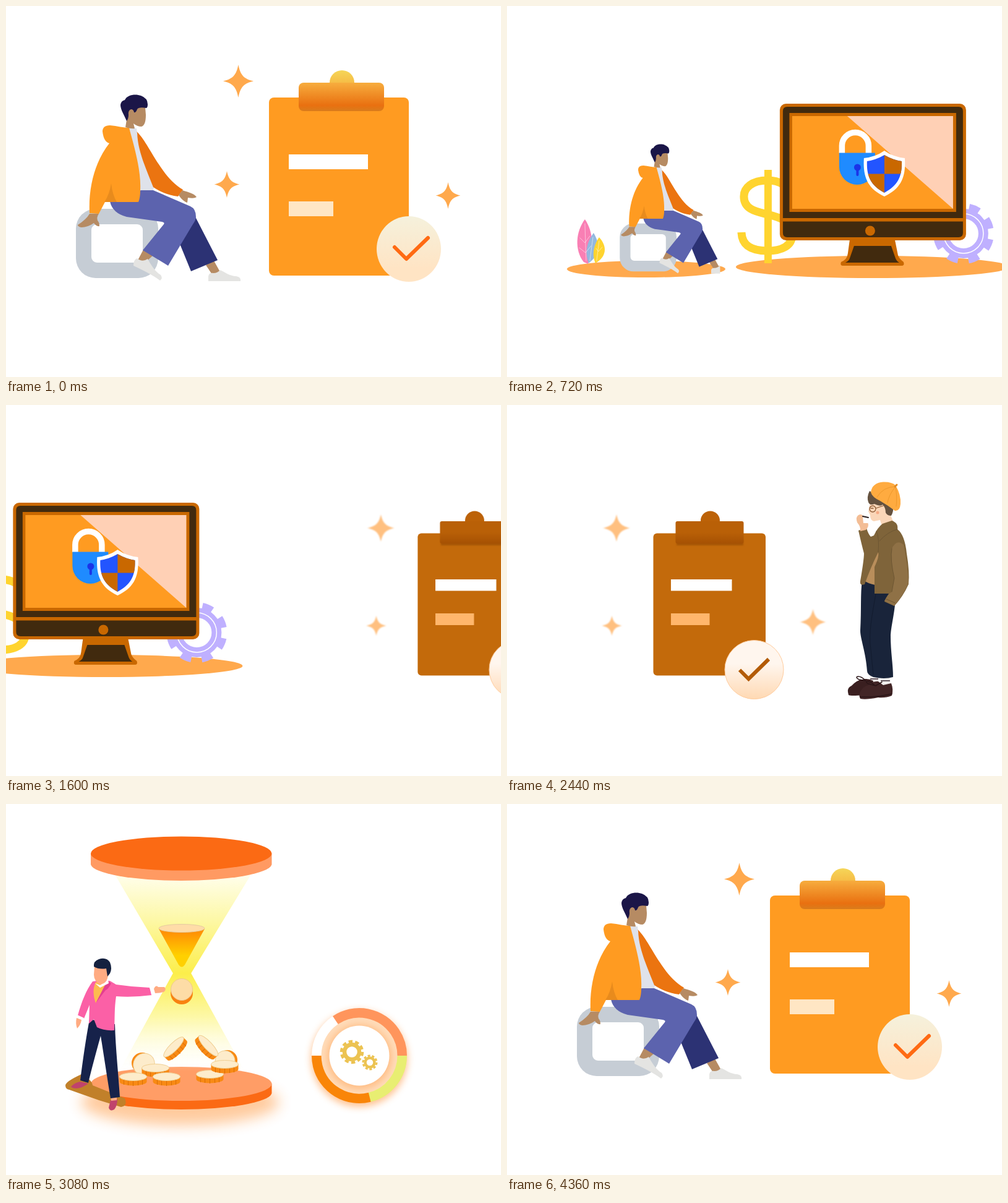
Recreate the animation shown at these times as an HTML page. Size 800 by 600 pixels, loop 4.4 s.

```html
<!DOCTYPE html>
<html lang="en">
<head>
<meta charset="utf-8">
<title>Sliding scenes</title>
<style>
html, body { margin: 0; width: 100%; height: 100%; overflow: hidden; background: #fff; }
svg { display: block; width: 100vw; height: 100vh; }
.skin { fill: #b68b63; }
.shoe { fill: #e4e4e2; }
.orange { fill: #ff9b21; }
.rust { fill: #c96800; }
.dark { fill: #412a0e; }
.line { fill: none; stroke-linecap: round; stroke-linejoin: round; }
</style>
</head>
<body>
<svg viewBox="0 0 800 600">
<defs>
  <linearGradient id="knob" x2="0" y2="1"><stop stop-color="#f5d658"/><stop offset=".6" stop-color="#f6b843"/></linearGradient>
  <linearGradient id="clip" x2="0" y2="1"><stop stop-color="#f7ad3e"/><stop offset=".8" stop-color="#e97010"/><stop offset="1" stop-color="#d97c1c"/></linearGradient>
  <linearGradient id="badge" x2="0" y2="1"><stop stop-color="#f5f1dc"/><stop offset=".8" stop-color="#ffe4c4"/></linearGradient>
  <linearGradient id="brownClip" x2="0" y2="1"><stop offset=".5" stop-color="#b96007"/><stop offset="1" stop-color="#a65103"/></linearGradient>
  <linearGradient id="paleBadge" x2="0" y2="1"><stop offset=".4" stop-color="#fff6ee"/><stop offset="1" stop-color="#ffd9b3"/></linearGradient>
  <linearGradient id="beamTop" x2="0" y2="1"><stop stop-color="#fffeec"/><stop offset=".45" stop-color="#fdf8a8"/><stop offset="1" stop-color="#fcee4a"/></linearGradient>
  <linearGradient id="beamLow" x2="0" y2="1"><stop stop-color="#fcee4a"/><stop offset=".45" stop-color="#fdf8a8"/><stop offset="1" stop-color="#fffef0" stop-opacity="0"/></linearGradient>
  <linearGradient id="cone" x2="0" y2="1"><stop offset=".1" stop-color="#ff9204"/><stop offset=".7" stop-color="#ffd000"/></linearGradient>
  <filter id="soft" x="-20%" y="-20%" width="140%" height="140%"><feGaussianBlur stdDeviation=".8"/></filter>
  <filter id="glow" x="-50%" y="-60%" width="200%" height="220%"><feGaussianBlur stdDeviation="11"/></filter>
  <filter id="halo" x="-30%" y="-30%" width="160%" height="160%"><feGaussianBlur stdDeviation="6"/></filter>
  <clipPath id="cut"><path d="M0 0H348V600H0Z"/></clipPath>
  <clipPath id="shield"><path d="M610 241Q624 249 638 251C639 274 633 290 610 302C587 290 581 274 582 251Q596 249 610 241Z"/></clipPath>

  <path id="star" d="M0-1C.14-.36 .36-.14 1 0C.36.14 .14.36 0 1C-.14.36-.36.14-1 0C-.36-.14-.14-.36 0-1Z"/>

  <g id="sitter">
    <path fill="#c6cdd5" fill-rule="evenodd" d="M145 328H214A32 32 0 0 1 246 360V408A32 32 0 0 1 214 440H145A32 32 0 0 1 113 408V360A32 32 0 0 1 145 328ZM147 353A9 9 0 0 0 138 362V406A9 9 0 0 0 147 415H212A9 9 0 0 0 221 406V362A9 9 0 0 0 212 353Z"/>
    <path class="skin" d="M323 419L336 412L346 430L333 434Z"/>
    <path class="shoe" d="M327 445V437Q328 431 335 432Q342 432 346 427C353 430 362 437 372 437Q380 438 379 445Z"/>
    <path fill="#2c3274" d="M306 341L342 411L299 429L279 380Z"/>
    <path class="skin" d="M222 394L238 403L227 413L212 413Z"/>
    <path class="shoe" d="M206 420Q206 410 212 408Q220 415 229 409C234 418 241 430 250 435Q254 440 249 444Q236 434 206 420Z"/>
    <path fill="#5c63ae" d="M168 316L218 298H238L298 324Q307 328 307 341Q307 346 302 353L262 420L221 395L255 353Q257 350 252 349L195 341Q172 335 168 316Z"/>
    <path fill="#dfe2ea" d="M196 197L211 198L212 205C216 240 230 265 239 294L238 298H217Z"/>
    <path fill="#eb7410" d="M211 203C230 219 250 277 286 297L278 308C262 306 250 301 238 293C226 262 213 235 212 205Z"/>
    <path class="skin" d="M285 298C295 301 305 304 308 309Q304 312 294 310L293 318Q286 316 279 306Z"/>
    <path class="orange" d="M156 203Q156 193 168 193C180 194 190 197 199 197C205 220 219 265 217 298Q217 310 214 317H160L150 336L135 335C133 290 145 250 167 222Q158 220 156 203Z"/>
    <path fill="#e88b1d" d="M170 287Q172 305 179 317H159Q167 305 170 287Z"/>
    <path class="skin" d="M135 336H150Q146 342 148 347Q151 350 151 356Q146 357 142 351Q132 358 122 358Q116 357 116 354Q130 345 135 336Z"/>
    <path class="skin" d="M195 184L193 196Q203 199 208 198L206 190Q212 195 219 195Q226 193 226 176L225 164L205 160L196 168Z"/>
    <path fill="#1b1648" d="M195 186C192 178 185 168 185 160Q186 153 192 152C196 143 210 142 218 145Q229 149 229 159Q229 164 227 165Q214 163 212 167Q210 173 207 172Q206 167 202 167Q197 169 198 176Q198 182 195 186Z"/>
  </g>

  <g id="coin">
    <path fill="#f88a14" d="M-22 0V8A22 6.5 0 0 0 22 8V0Z"/>
    <path stroke="#d96f08" d="M-15 5V13M-8 6V14M0 7V15M8 6V14M15 5V13"/>
    <ellipse rx="22" ry="6.5" fill="#fdeccb" stroke="#f0cf92"/>
  </g>
</defs>

<g class="slide">
  <g fill="#ffa94d">
    <use href="#star" transform="translate(375.5 121.5) scale(24.5 26.5)"/>
    <use href="#star" transform="translate(357 288.5) scale(20.5 21.5)"/>
    <use href="#star" transform="translate(714.5 306.5) scale(20 21.5)"/>
  </g>
  <use href="#sitter"/>
  <rect class="orange" x="425" y="148" width="226" height="288" rx="8"/>
  <circle cx="543" cy="124" r="20" fill="url(#knob)"/>
  <rect x="473" y="124" width="138" height="46" rx="8" fill="url(#clip)"/>
  <path fill="#fff" d="M457 240h128v24h-128z"/>
  <path fill="#ffe6c4" d="M457 316h72v24h-72z"/>
  <ellipse cx="651" cy="393" rx="52" ry="53" fill="url(#badge)"/>
  <path class="line" stroke="#ff6a13" stroke-width="6" d="M628 390L647 409L682 375"/>
</g>

<g class="slide"><g transform="translate(-53)">
  <g fill="#ffa94d">
    <ellipse cx="225" cy="425.5" rx="128" ry="13.5"/>
    <ellipse cx="591" cy="422" rx="221" ry="18"/>
  </g>
  <path fill="#f97fb4" d="M126 345C111 365 109 395 124 414L131 417C141 395 140 365 126 345Z"/>
  <path fill="#93b8df" d="M140 367C151 385 151 402 132 416C124 395 132 378 140 367Z"/>
  <path fill="#ffd42f" d="M149 374C162 388 162 405 143 416C136 400 142 384 149 374Z"/>
  <path class="line" stroke="#fff" stroke-opacity=".5" d="M126 352L128 412M118 375L126 383L134 372M117 391L127 399L136 388M139 374L134 412M149 380L145 412M144 392L148 397L154 390"/>
  <g transform="translate(104.4 124) scale(.69 .694)"><use href="#sitter" clip-path="url(#cut)"/></g>
  <path fill="none" stroke="#ffd42f" stroke-width="13" d="M459 308C456 290 440 282 421 282C396 282 383 294 383 308C383 330 405 333 421 337C447 343 461 350 461 370C461 388 444 396 421 396C396 396 380 388 379 366"/>
  <path fill="#ffd42f" d="M416 265h12v151h-12z"/>
  <g transform="translate(738 368)" fill="none" stroke="#bfb0ff">
    <circle r="43" stroke-width="12" pathLength="16" stroke-dasharray="1" transform="rotate(-78)"/>
    <circle r="32" stroke-width="16"/>
    <circle r="32" stroke="#fff" stroke-width="1.5"/>
  </g>
  <rect class="rust" x="441" y="158" width="301" height="221" rx="10"/>
  <path class="dark" d="M453 163H730Q737 163 737 170V343H446V170Q446 163 453 163ZM446 348.5H737V367Q737 374 730 374H453Q446 374 446 367Z"/>
  <path class="rust" d="M456.5 173H726V333H456.5Z"/>
  <path class="orange" d="M461 178H721V328H461Z"/>
  <path fill="#ffd0b5" d="M550 178H721V328Z"/>
  <circle class="rust" cx="587" cy="363.5" r="8"/>
  <path class="rust" d="M554 378H627L632 403Q634 409 641 414Q643 420 638 420H543Q538 420 540 414Q550 410 551 400Z"/>
  <path class="dark" d="M561 388H621L628 408Q630 413 634 415H547Q553 412 554 408Z"/>
  <path fill="none" stroke="#fff" stroke-width="9.5" d="M541.5 238V226A21.5 21.5 0 0 1 584.5 226V238"/>
  <path fill="#1f8bff" d="M537 237.5H595V260A29 29 0 0 1 537 260Z"/>
  <g fill="#1a34e8"><circle cx="566.5" cy="261" r="5.5"/><rect x="564.5" y="261" width="4" height="14" rx="2"/></g>
  <path fill="#fff" d="M610 234Q624 244 643 246C645 275 638 295 610 308C582 295 575 275 577 246Q596 244 610 234Z"/>
  <g clip-path="url(#shield)">
    <path fill="#2355ff" d="M575 235H645V310H575Z"/>
    <path class="rust" d="M610 235H645V271.5H575V310H610Z"/>
  </g>
</g></g>

<g class="slide"><g transform="translate(5.5)">
  <g fill="#ffc080" filter="url(#soft)">
    <use href="#star" transform="translate(177 199) scale(22)"/>
    <use href="#star" transform="translate(169.5 357) scale(16)"/>
    <use href="#star" transform="translate(494.5 351) scale(21)"/>
  </g>
  <rect x="236.5" y="207.5" width="181.5" height="230" rx="6" fill="#c36a0b"/>
  <path fill="#8a4300" opacity=".5" filter="url(#soft)" d="M274 218H382V227H274Z"/>
  <circle cx="328.5" cy="187" r="15.5" fill="#bc6208"/>
  <rect x="272.5" y="188" width="110" height="36" rx="3" fill="url(#brownClip)"/>
  <path fill="#fff" d="M265 282h98.500v18.500h-98.500z"/>
  <path fill="#ffb66c" d="M265 337h62.500v19h-62.500z"/>
  <circle cx="399.5" cy="428" r="47.5" fill="url(#paleBadge)" stroke="#ffcb9c"/>
  <path fill="none" stroke="#b35b05" stroke-width="6" d="M376 428.5L390.5 443L423 411"/>

  <path fill="#f2f0ee" d="M586 436H600V450H586ZM604 440H619V455H604Z"/>
  <path stroke="#3a2a33" stroke-width="1.5" d="M587 443H600M604 446H619"/>
  <path fill="#3a1f20" d="M551 464Q550 457 557 454Q565 445 574 444Q582 441 592 446L590 460L576 469Q556 471 552 469Z"/>
  <path fill="#422526" d="M571 464Q574 456 584 453Q590 446 600 447L608 453L621 450Q625 460 622 470Q612 474 600 473Q580 477 571 475Q568 470 571 464Z"/>
  <path class="line" stroke="#2a1517" stroke-width="1.5" d="M579 445C568 435 560 440 569 444L580 446M594 453C584 444 576 447 584 451L596 454L606 448M571 472Q600 473 622 467"/>
  <path fill="#19243a" d="M574 284Q578 280 586 285L628 308C628 330 621 356 620 372C620 400 624 420 624 440Q610 444 592 440Q582 436 582 430C580 400 571 378 571 365C573 330 571 305 574 284Z"/>
  <path class="line" stroke="#121b2e" d="M596 306C590 340 584 370 588 395L592 436"/>
  <path fill="#fad6b8" d="M587 158L584 172L587 178Q587 187 593 188L603 186L606 196L624 188L616 168L608 156Z"/>
  <path fill="#b98e5b" d="M598 214L584 250L577 284Q584 289 595 291L604 230Z"/>
  <path fill="#7f643a" d="M568 203L581 199Q584 209 588 213L593 211Q599 198 607 192L622 187Q633 191 631 201Q643 210 646 240Q651 270 649 290Q640 310 626 325L610 318L617 305L594 305L594 262Q602 245 600 238Q588 262 578 290Q570 293 571 285Q577 250 577 240Q573 225 568 203Z"/>
  <path fill="#8f7146" d="M622 232Q630 216 641 226Q648 260 649 288Q640 308 626 325L610 317Q615 306 622 302L626 280Q619 250 622 232Z"/>
  <path class="line" stroke="#6d5633" d="M622 232Q619 250 626 280L622 302M597 204Q602 214 600 238M631 201Q615 205 602 220M613 314L627 320"/>
  <path fill="#f3bd95" d="M571 204Q572 197 566 190Q563 181 568 178Q573 175 576 180L583 190Q586 196 580 202Z"/>
  <path fill="#fff" d="M575 181L585 183L583 191H576Z"/>
  <path class="line" stroke="#2c2020" stroke-width="2" d="M575 180L584 182"/>
  <path fill="#65523f" d="M586 139Q581 149 584 157Q586 163 594 160Q604 165 607 161Q612 166 612 174Q614 179 621 179Q625 172 624 166L600 148Z"/>
  <path fill="#ffab40" d="M588 141Q590 126 608 124.5Q622 124 628 130Q637 145 636 160Q635 172 627 171Q615 162 603 155Q590 149 588 141Z"/>
  <path class="line" stroke="#ee982b" d="M628 132Q608 132 598 149M628 132Q617 145 615 158M628 132Q631 150 629 164"/>
  <path class="line" stroke="#e28b24" stroke-width="3" d="M627 132L630 129"/>
  <path class="line" stroke="#8c5a33" stroke-width="1.3" d="M586 168A5 5 0 1 0 596 168A5 5 0 1 0 586 168M596 167L608 163M588 167H592"/>
  <circle cx="599" cy="174" r="2.5" fill="#f6aa85"/>
</g></g>

<g class="slide">
  <ellipse cx="281" cy="482" rx="160" ry="38" fill="#ff9336" opacity=".48" filter="url(#glow)"/>
  <path fill="#fb6a14" d="M137 452V468A146.5 27.5 0 0 0 429.5 468V452Z"/>
  <ellipse cx="283.25" cy="452.5" rx="146.25" ry="27.5" fill="#ff9d66"/>
  <path fill="url(#beamTop)" d="M176 114H396L299 274H270Z"/>
  <path fill="url(#beamLow)" d="M270 273.5H299L386 432H183Z"/>
  <path fill="#ff9a62" d="M137 80V98A146.5 27.5 0 0 0 429.5 98V80Z"/>
  <ellipse cx="283.25" cy="80" rx="146.25" ry="27.5" fill="#fb6a14"/>
  <path fill="url(#cone)" d="M247 202H321L289 260Q284 267 279 260Z"/>
  <ellipse cx="284" cy="201" rx="37" ry="6.5" fill="#ffdca8" stroke="#e5cba0"/>
  <circle cx="284" cy="306" r="18" fill="#f88210"/>
  <circle cx="284" cy="300" r="17.5" fill="#fddca6" stroke="#efc88b"/>

  <g stroke="#f0cf92">
    <circle cx="220" cy="419" r="17" fill="#f88a14" stroke="none"/>
    <ellipse cx="223" cy="421" rx="17" ry="18" fill="#fdeccb" transform="rotate(30 223 421)"/>
    <circle cx="358" cy="414" r="16" fill="#f88a14" stroke="none"/>
    <ellipse cx="354" cy="416" rx="16" ry="17" fill="#fdeccb"/>
  </g>
  <use href="#coin" transform="translate(271 393) rotate(-45)"/>
  <use href="#coin" transform="translate(327 391) rotate(47)"/>
  <use href="#coin" x="241.5" y="427"/>
  <use href="#coin" x="205.5" y="441"/>
  <use href="#coin" x="259.5" y="441"/>
  <use href="#coin" x="329.5" y="437"/>
  <use href="#coin" x="353.5" y="421"/>

  <path fill="#c1802a" d="M96 455Q96 449 122 437Q139 446 140 455L192 476Q197 488 186 490L150 479L102 462Q96 461 96 455Z"/>
  <path fill="#c0436c" d="M105 457Q112 450 120 449L133 452Q124 459 114 460Q107 460 105 457ZM169 479L180 477Q180 488 175 494Q168 498 166 491Z"/>
  <path fill="#ffab82" d="M169 473H179V479L170 480Z"/>
  <path fill="#16224a" d="M135 348L176 356C177 395 182 440 184 474L169 476C163 440 158 405 153 375C146 400 138 430 133 451L120 447C124 415 129 380 135 348Z"/>
  <path fill="#fb60a6" d="M140 287Q156 284 168 286L178 292Q205 296 232 297L236 309Q205 313 178 311C175 330 176 345 175 366Q158 367 147 361L142 348L134 355L135 325L126 347L116 342C122 320 130 300 140 287Z"/>
  <path fill="#e33f90" d="M163 285L170 290Q165 300 161 301L145 322Z"/>
  <path fill="#fdbb4f" d="M145 288L162 289L145 322Q138 303 145 288Z"/>
  <path fill="#fff" d="M144 290L152 293L165 284L166 290L152 297ZM115 341L126 346L124 350L113 345ZM232 296L239 295L242 307L235 309Z"/>
  <path fill="#ffab82" d="M114 346L122 349Q121 357 115 363Q112 355 114 346ZM239 299Q242 292 246 296H256Q260 300 255 304Q248 306 241 306ZM143 263L165 264V278Q163 290 153 292Q142 287 142 276Z"/>
  <path fill="#14213f" d="M142 263Q141 254 150 251Q162 247 168 256Q172 266 168 274L164 279L162 266Q150 268 142 263Z"/>

  <g transform="translate(571 407)">
    <circle cy="5" r="78" fill="#ff9c4c" opacity=".6" filter="url(#halo)"/>
    <circle r="64" fill="#ffdcba"/>
    <circle cy="2" r="52" fill="#ff9c4c" opacity=".5" filter="url(#halo)"/>
    <g fill="none" stroke-width="15.5">
      <circle r="69.25" pathLength="360" stroke="#ff955c" stroke-dasharray="124 360" transform="rotate(-124)"/>
      <circle r="69.25" pathLength="360" stroke="#e8ee72" stroke-dasharray="76 360"/>
      <circle r="69.25" pathLength="360" stroke="#f98508" stroke-dasharray="104 360" transform="rotate(76)"/>
      <circle r="69.25" pathLength="360" stroke="#fff" stroke-dasharray="56 360" transform="rotate(180)"/>
    </g>
    <circle r="48.5" fill="#fff"/>
  </g>
  <g fill="none" stroke="#ecc352">
    <g transform="translate(559 401)">
      <circle r="17" stroke-width="4.5" pathLength="20" stroke-dasharray="1.2 .8"/>
      <circle r="12" stroke-width="6.5"/>
    </g>
    <g transform="translate(588 418)">
      <circle r="11" stroke-width="3" pathLength="20" stroke-dasharray="1.2 .8"/>
      <circle r="7.5" stroke-width="4.5"/>
    </g>
  </g>
</g>
</svg>
<script>
const LOOP = 4400, STEP = 40;
const slides = [...document.querySelectorAll('.slide')];
// Each move pushes one slide out to the left and brings in the next.
const moves = [
  { start: 0, span: 880, gap: 800 },
  { start: 1240, span: 742, gap: 800 },
  { start: 2400, span: 680, gap: 800 },
  { start: 3350, span: 1000, gap: 805 }
];
const ease = u => u < .5 ? 2 * u * u : 1 - 2 * (1 - u) ** 2;

function place(slide, x) {
  slide.setAttribute('transform', `translate(${x.toFixed(2)})`);
  slide.setAttribute('visibility', 'visible');
}

function draw(ms) {
  const t = Math.floor(ms % LOOP / STEP) * STEP;
  const i = moves.filter(m => m.start <= t).length - 1;
  const { start, span, gap } = moves[i];
  const p = ease(Math.min(1, (t - start) / span));
  slides.forEach(s => s.setAttribute('visibility', 'hidden'));
  place(slides[i], -p * gap);
  place(slides[(i + 1) % slides.length], (1 - p) * gap);
}

const begin = performance.now();
function tick() {
  draw(performance.now() - begin);
  requestAnimationFrame(tick);
}
tick();
</script>
</body>
</html>
```
